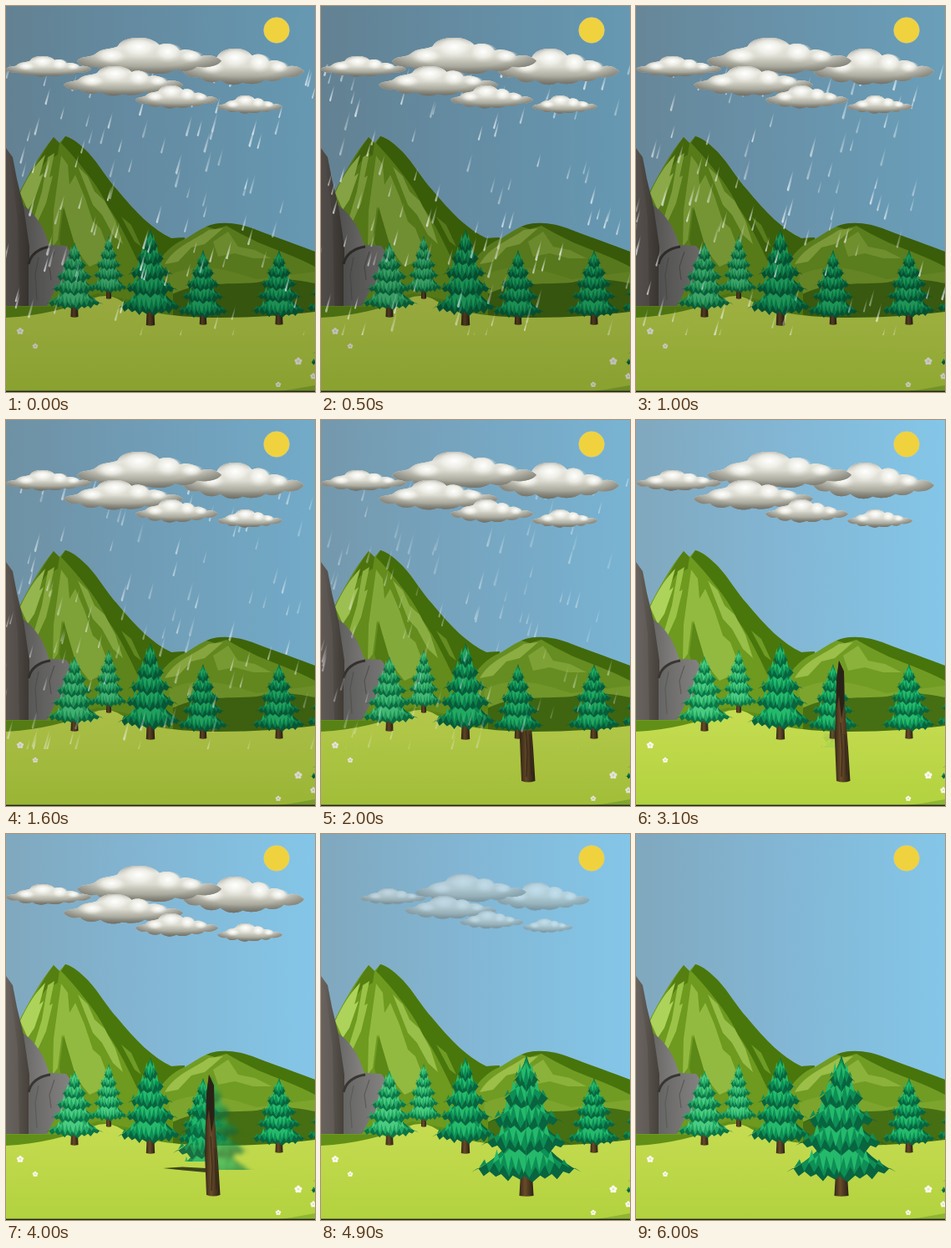
These frames come from a looping animation (370 by 462 pixels, 6.4 s). An HTML page:

```html
<!DOCTYPE html>
<html lang="en">
<head>
<meta charset="utf-8">
<title>After the rain</title>
<style>
html, body { margin: 0; width: 100%; height: 100%; overflow: hidden; }
svg { display: block; width: 100vw; height: 100vh; }
</style>
</head>
<body>
<svg id="stage" viewBox="0 0 370 462" preserveAspectRatio="none">
  <defs>
    <linearGradient id="sky"><stop stop-color="#80a8be"/><stop offset=".4" stop-color="#82b4d1"/><stop offset="1" stop-color="#84c6e8"/></linearGradient>
    <linearGradient id="grass" x2="0" y2="1"><stop stop-color="#c6dc52"/><stop offset="1" stop-color="#b2d23e"/></linearGradient>
    <linearGradient id="rock"><stop stop-color="#696460"/><stop offset="1" stop-color="#464039"/></linearGradient>
    <linearGradient id="stone"><stop stop-color="#656564"/><stop offset="1" stop-color="#878583"/></linearGradient>
    <linearGradient id="bark"><stop stop-color="#372817"/><stop offset=".4" stop-color="#684c29"/><stop offset="1" stop-color="#2c2115"/></linearGradient>
    <linearGradient id="shade" x2="0" y2="1"><stop stop-color="#f5f5f0"/><stop offset=".5" stop-color="#dcdcd2"/><stop offset=".78" stop-color="#a9a89c"/><stop offset="1" stop-color="#74736a"/></linearGradient>
    <radialGradient id="puff" cy=".35"><stop stop-color="#fff"/><stop offset=".5" stop-color="#f3f3ed" stop-opacity=".75"/><stop offset="1" stop-color="#d5d5ca" stop-opacity="0"/></radialGradient>
    <radialGradient id="tips" gradientTransform="translate(-.1 -.1) scale(1.2)"><stop offset=".5" stop-color="#77766c" stop-opacity="0"/><stop offset="1" stop-color="#696860" stop-opacity=".85"/></radialGradient>
    <linearGradient id="drop" x1="1" x2="0" y2="1"><stop stop-color="#fff" stop-opacity=".15"/><stop offset="1" stop-color="#f2f7fa" stop-opacity=".9"/></linearGradient>
    <filter id="blur" x="-20%" y="-20%" width="140%" height="140%"><feGaussianBlur id="soft" stdDeviation="2"/></filter>
    <clipPath id="leftHalf"><rect id="leftBox" x="150" y="240" width="95.5" height="152"/></clipPath>
    <clipPath id="rightHalf"><rect id="rightBox" x="245" y="240" width="95" height="162"/></clipPath>
    <clipPath id="sprout"><rect id="sproutBox" x="230" width="40" height="200"/></clipPath>
    <clipPath id="rainArea"><rect y="70" width="370" height="324"/></clipPath>
    <path id="streak" d="M6 0Q4 13 1 23.5Q-1 25-1.3 22Q2 10 6 0Z" fill="url(#drop)"/>
    <g id="cloud">
      <path id="puffy" d="M0 16C4 12 10 14 13 11C17 7 24 8 28 6C31 1 37 0 43 0C50 0 54 2 57 5C62 3 68 4 71 9C76 7 83 9 86 13C91 11 97 13 100 16C97 20 89 21 83 20C80 23 73 24 68 22C62 26 53 25 49 24C43 27 34 25 31 22C25 25 17 24 14 20C8 21 3 20 0 16Z" fill="url(#shade)"/>
      <use href="#puffy" style="fill:url(#tips)"/>
      <path d="M0 16C4 12 10 14 13 11C17 7 24 8 28 6C31 1 37 0 43 0C50 0 54 2 57 5C62 3 68 4 71 9C76 7 83 9 86 13C91 11 97 13 100 16C97 20 89 21 83 20C80 23 73 24 68 22C62 26 53 25 49 24C43 27 34 25 31 22C25 25 17 24 14 20C8 21 3 20 0 16Z" fill="url(#tips)"/>
      <g fill="url(#puff)"><ellipse cx="24" cy="14" rx="12" ry="6"/><ellipse cx="43" cy="9" rx="15" ry="9"/><ellipse cx="63" cy="12" rx="11" ry="8"/><ellipse cx="79" cy="14" rx="9" ry="5"/></g>
    </g>
    <g id="flower" fill="#fafaf2"><circle cy="-2.4" r="1.7"/><circle cx="2.4" cy="-.5" r="1.7"/><circle cx="1.5" cy="2.2" r="1.7"/><circle cx="-1.5" cy="2.2" r="1.7"/><circle cx="-2.4" cy="-.5" r="1.7"/><circle r="1.2" fill="#e8e3b0"/></g>
    <g id="pine"></g>
  </defs>

  <rect width="370" height="462" fill="url(#sky)"/>

  <!-- mountain -->
  <path d="M0 250L15 225C26 204 40 177 57 157L64 164L71 156C80 158 90 167 98 175C111 189 121 207 133 220C155 247 176 268 198 278L214 277L230 380H0Z" fill="#6d9a1f"/>
  <path d="M71 156C80 158 90 167 98 175C111 189 121 207 133 220C155 247 176 268 198 278L214 277L205 320H165C150 290 138 262 122 240C112 218 97 200 84 184C78 177 72 170 66 164Z" fill="#4a770c"/>
  <path d="M57 157L64 164L62 178L48 186L36 202L20 222C30 203 43 175 57 157Z" fill="#557f10"/>
  <path d="M17 224C25 206 35 190 47 178L40 204L45 200L34 232L26 244Z" fill="#add35a"/>
  <path d="M50 181L58 176L52 205L56 203L48 236L38 258L34 252L43 222Z" fill="#9bc348"/>
  <path d="M66 179L74 190L76 214L83 202L94 228L104 258L113 266L126 300L100 312L84 292L74 258L67 240L62 280L56 288L57 245Z" fill="#92ba41"/>
  <path d="M86 192L98 204L106 222L118 233L131 257L140 285L128 274L115 250L104 238Z" fill="#98bf49"/>
  <path d="M69 240L74 258L84 292L70 304L64 280Z" fill="#5b8816"/>
  <path d="M138 252L150 262L162 288L154 282Z" fill="#6f9c25"/>
  <!-- far hill -->
  <path d="M178 314C188 296 199 285 214 279C227 272 238 261 258 260C288 260 326 279 370 294V380H178Z" fill="#719c24"/>
  <path d="M240 264C256 257 278 259 300 268C326 278 350 286 370 294V312C348 300 324 292 302 283L280 272L264 263L250 267Z" fill="#48740c"/>
  <path d="M190 309C202 288 224 281 243 268L260 266L238 285L222 289L206 306Z" fill="#9bbf48"/>
  <path d="M248 282L266 270L278 288L298 292L318 302L296 302L274 296L254 300Z" fill="#8bb23a"/>
  <path d="M196 322C235 304 270 318 300 327L370 318V376H190Z" fill="#7da52e"/>
  <path d="M188 352C220 328 265 334 300 331C330 324 350 328 370 332V376H188Z" fill="#466f13"/>
  <!-- meadow -->
  <path d="M0 360H60L110 344L150 352L200 340V385H0Z" fill="#628f18"/>
  <path d="M0 373C40 371 75 362 104 350Q122 343 138 353C160 367 205 373 255 373C300 373 335 370 370 366V462H0Z" fill="url(#grass)"/>
  <path d="M318 462Q345 459 370 454V462Z" fill="#8eb632"/>
  <!-- rocks -->
  <path d="M18 237C32 245 42 260 48 275L53 290L34 297L30 359H18Z" fill="url(#stone)"/>
  <path d="M0 170L8 181L13 207L21 240L28 288V359H0Z" fill="url(#rock)"/>
  <path d="M0 178L5 186L9 216L14 255L16 359H0Z" fill="#6a6360" opacity=".55"/>
  <path d="M27 359V305C30 294 41 288 54 286L72 287L81 299L76 322L61 336L49 359Z" fill="url(#stone)"/>
  <path d="M27 309C30 295 41 290 53 288" fill="none" stroke="#393632" stroke-width="3"/>
  <path d="M39 301L35 321L37 352M58 294L52 312L54 328" fill="none" stroke="#5d5c5b" stroke-width="1.3"/>

  <g id="woods"></g>
  <g id="flowers"></g>

  <!-- growing tree -->
  <g clip-path="url(#rightHalf)" id="right"><g filter="url(#blur)" id="hazy"><use href="#pine" class="grow"/></g></g>
  <g clip-path="url(#leftHalf)" id="left"><use href="#pine" class="grow"/></g>
  <g id="stem">
    <path id="twig" d="M188 400L211 398.500L240 400V405L212 402.500Z" fill="#3c451b"/>
    <g clip-path="url(#sprout)">
      <path d="M243 288L249 301L250 342L254 392L256.500 432Q248 435 240 432L238 382L240 312Z" fill="url(#bark)"/>
      <path d="M243 288L249 301L249.500 338L246 358L243 330L240 346L240 312Z" fill="#292317"/>
      <path d="M245 362L247 398L246 427M250 376L252 425" stroke="#34271a" fill="none"/>
    </g>
  </g>

  <rect id="dim" width="370" height="462"/>
  <circle cx="324" cy="29" r="15.300" fill="#f0d23e" stroke="#d8cf8c" stroke-opacity=".6"/>
  <g id="rain" clip-path="url(#rainArea)"></g>
  <g id="clouds"></g>
  <rect y="460.600" width="370" height="1.400" fill="#20251a"/>
</svg>
<script>
const LOOP = 6400, STEP = 100;
const $ = id => document.getElementById(id);
const ramp = (t, a, b) => Math.min(1, Math.max(0, (t - a) / (b - a)));
const set = (id, name, value) => $(id).setAttribute(name, value);

const DEEP = ['#08653f', '#0d8f55', '#25b96b'];
const FRESH = ['#0d7647', '#23a863', '#4acb80'];

// Tiers from the ground up: top, bottom, half width, teeth
const TIERS = [[.48, .92, 1, 9], [.35, .71, .83, 8], [.22, .53, .68, 7], [.1, .36, .47, 5], [0, .21, .25, 4]];

function pine(cx, top, bottom, half, foot, tones) {
  const height = bottom - top;
  const at = (u, v) => (cx + u * half).toFixed(1) + ' ' + (top + v * height).toFixed(1);
  function fan(v0, v1, w, n, depth, shift, fill) {
    const span = v1 - v0;
    let d = `M${at(shift * .4, v0)}Q${at(w * .35 + shift, v0 + span * .7)} ${at(w + shift, v1)}`;
    for (let i = 1; i <= n; i++) {
      const tip = 1 - 2 * i / n, gap = tip + 1 / n;
      const sag = x => v1 + .08 * (1 - x * x);
      d += `L${at((gap + .4 / n * Math.sign(gap)) * w * .94 + shift, sag(gap) - depth)}`;
      d += `L${at(tip * w + shift, sag(tip) - (i < n && i % 2 ? .02 : 0))}`;
    }
    d += `Q${at(-w * .35 + shift, v0 + span * .7)} ${at(shift * .4, v0)}Z`;
    return `<path d="${d}" fill="${fill}"/>`;
  }
  const tw = half * .13;
  let out = `<path d="M${cx - tw * .8} ${bottom - 12}H${cx + tw * .8}L${cx + tw} ${foot}Q${cx} ${foot + 1.5} ${cx - tw} ${foot}Z" fill="url(#bark)"/>`;
  for (const [v0, v1, w, n] of TIERS) {
    out += fan(v0, v1, w, n, .05, 0, tones[0]);
    out += fan(v0 + .01, v1 - .035, w * .82, n, .085, -w * .04, tones[1]);
    out += fan(v0 + .05, v1 - .07, w * .56, n - 1, .13, -w * .05, tones[2]);
  }
  return out;
}

$('woods').innerHTML = [
  [123, 275, 344, 24, 350, FRESH],
  [82, 283, 364, 35, 372, FRESH],
  [173, 267, 371, 40, 382, DEEP],
  [236, 292, 374, 33, 381, DEEP],
  [327, 292, 373, 35, 381, DEEP],
  [392, 290, 370, 35, 380, DEEP],
  [386, 378, 432, 23, 436, DEEP]
].map(a => pine(...a)).join('');
$('pine').innerHTML = pine(246, 265, 417, 66, 433, DEEP);

$('flowers').innerHTML = [[17, 389, 1], [35, 407, .8], [350, 425, 1.1], [368, 443, .9], [326, 453, .8]]
  .map(([x, y, s]) => `<use href="#flower" transform="translate(${x} ${y}) scale(${s})"/>`).join('');

// Clouds: x, y, width, height
$('clouds').innerHTML = [[212, 51, 145, 44], [85, 38, 173, 45], [0, 60, 102, 25], [69, 72, 143, 36], [155, 95, 99, 28], [253, 107, 78, 22]]
  .map(([x, y, w, h]) => `<use href="#cloud" transform="translate(${x} ${y}) scale(${w / 100} ${h / 26})"/>`).join('');

let seed = 29;
const rnd = () => (seed = seed * 16807 % 2147483647) / 2147483647;
const drops = Array.from({ length: 135 }, () => ({
  x: rnd() * 460, y: rnd() * 340, size: .65 + rnd() * .45, speed: .26 + rnd() * .08, glow: .45 + rnd() * .45
}));
$('rain').innerHTML = drops.map(d => `<use href="#streak" opacity="${d.glow.toFixed(2)}"/>`).join('');
const streaks = [...$('rain').children];
const growing = document.querySelectorAll('.grow');

function draw(t) {
  set('dim', 'opacity', .23 * (1 - ramp(t, 700, 2900)));

  const wet = 1 - ramp(t, 1200, 3100);
  set('rain', 'opacity', wet);
  if (wet) drops.forEach((d, i) => {
    const y = (d.y + t * d.speed) % 340;
    streaks[i].setAttribute('transform', `translate(${(d.x - y * .25 - 5).toFixed(1)} ${(58 + y).toFixed(1)}) scale(${d.size.toFixed(2)})`);
  });

  // Stem rises, then foliage spreads over it
  set('sproutBox', 'y', 436 - 150 * ramp(t, 1700, 2400));
  set('stem', 'opacity', 1 - ramp(t, 4050, 4550));
  set('twig', 'opacity', ramp(t, 3300, 3800));
  const size = .55 + .45 * ramp(t, 3000, 4500);
  growing.forEach(g => g.setAttribute('transform', `translate(247 433) scale(${size}) translate(-247 -433)`));
  set('left', 'opacity', ramp(t, 3000, 4100));
  set('right', 'opacity', ramp(t, 3300, 4400));
  const fill = ramp(t, 4000, 4500);
  set('leftBox', 'height', 152 + 50 * fill);
  set('rightBox', 'height', 162 + 40 * fill);
  set('soft', 'stdDeviation', 2.4 * (1 - fill));
  if (fill < 1) set('hazy', 'filter', 'url(#blur)');
  else $('hazy').removeAttribute('filter');

  const leave = ramp(t, 4500, 5300);
  set('clouds', 'opacity', 1 - leave);
  set('clouds', 'transform', `translate(204 82) scale(${1 - .46 * leave}) translate(-204 -82)`);
}

const start = performance.now();
function tick() {
  const t = (performance.now() - start) % LOOP;
  draw(Math.floor(t / STEP) * STEP);
  requestAnimationFrame(tick);
}
tick();
</script>
</body>
</html>
```
